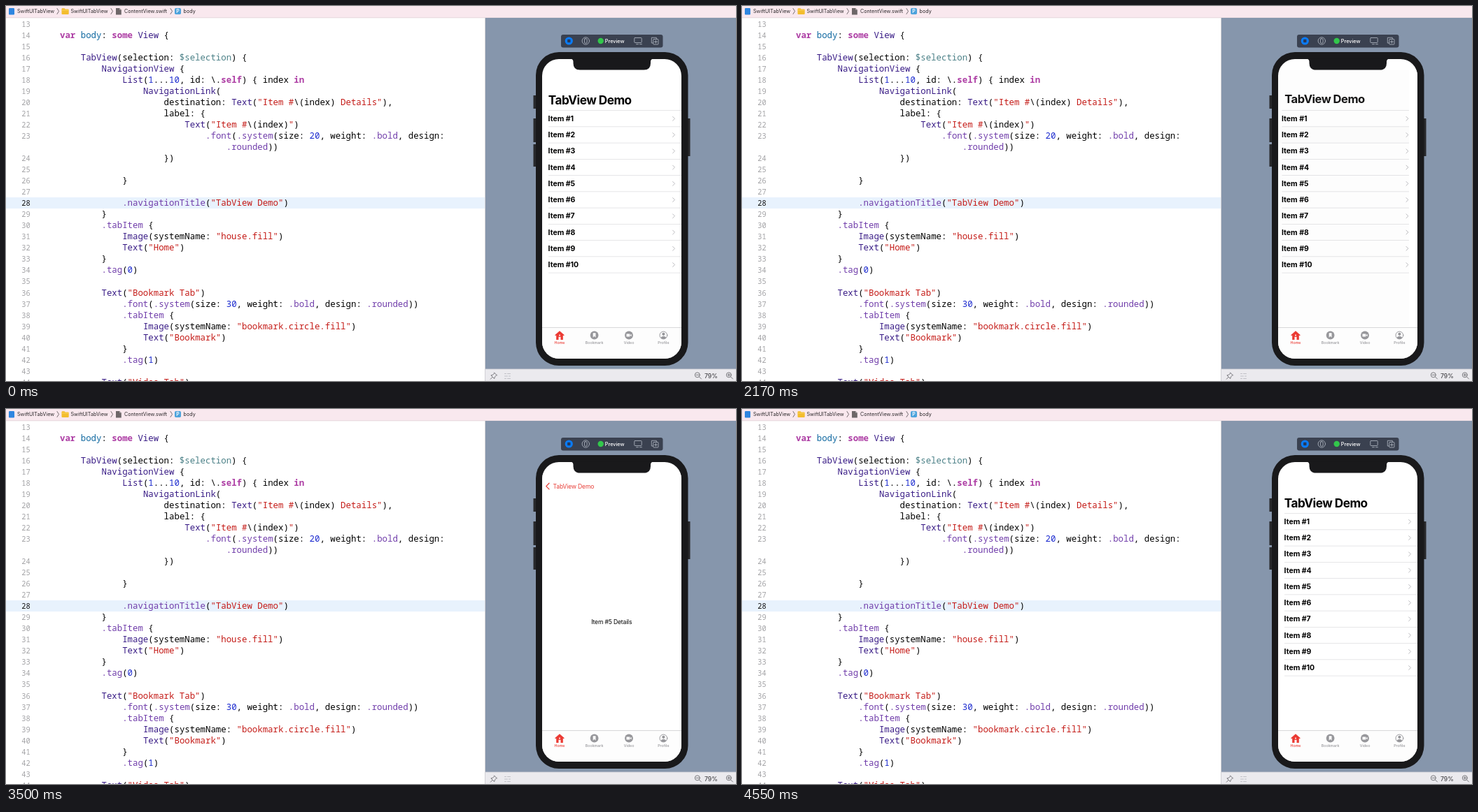
These frames come from a looping animation (1043x537 px, 4830 ms). An HTML page:

```html
<!DOCTYPE html>
<html lang="en">
<head>
<meta charset="utf-8">
<title>TabView Demo</title>
<style>
  html, body { margin: 0; width: 100%; height: 100%; overflow: hidden; background: #fff; }
  svg { display: block; width: 1043px; height: 537px; }
  text { font-family: Inter, "Open Sans", sans-serif; white-space: pre; }
  .code text { font-family: "Noto Sans Mono", "DejaVu Sans Mono", monospace; font-size: 12.38px; font-weight: 500; }
  .code .num { font-size: 10.4px; font-weight: 400; fill: #a3a3a6; text-anchor: end; }
  .code .now { fill: #111; font-weight: 500; }
  .key { fill: #ad3da4; font-weight: 600; }
  .type { fill: #391c86; }
  .call { fill: #703daa; }
  .str { fill: #c41a16; }
  .lit { fill: #1c2bcf; }
  .decl { fill: #0f68a0; }
  .state { fill: #4b8087; }
  .path { font-size: 7.2px; fill: #2c282b; }
  .item { font-size: 10.5px; font-weight: 700; }
  .big { font-size: 17.2px; font-weight: 700; letter-spacing: -.03em; }
  .small { font-size: 8.6px; letter-spacing: -.02em; }
  .tab { font-size: 5.3px; font-weight: 500; text-anchor: middle; }
  .line { fill: none; stroke-linecap: round; stroke-linejoin: round; }
</style>
</head>
<body>
<svg viewBox="0 0 1043 537">
  <defs>
    <clipPath id="screen"><rect x="766" y="76" width="199" height="429" rx="24"/></clipPath>
    <clipPath id="page"><rect x="766" y="92" width="199" height="368.5"/></clipPath>
  </defs>

  <rect width="1043" height="537" fill="#fff"/>
  <rect y="274" width="685" height="16" fill="#e8f2fd"/>
  <g class="code" id="code"></g>

  <!-- path bar -->
  <rect width="1043" height="17" fill="#f9e8ee"/>
  <rect y="16.5" width="1043" height=".7" fill="#dccfd4"/>
  <rect x="4" y="3" width="8" height="9.5" rx="1.2" fill="#2f86e0"/>
  <path d="M79.5 4.2q0-1 1-1h3l1.2 1.2h4q1 0 1 1v5.6q0 1-1 1h-8.200q-1 0-1-1z" fill="#f3bd2e"/>
  <path d="M79.500 6h10.200" stroke="#fbd768" stroke-width=".8"/>
  <path d="M157 3h5.200l2.600 2.600v7h-7.800z" fill="#6d6668"/>
  <path d="M162.200 3v2.600h2.600z" fill="#bdb4b7"/>
  <rect x="241" y="3" width="9" height="9" rx="1.800" fill="#4da3dc"/>
  <text x="245.500" y="10.100" font-size="7" font-weight="600" text-anchor="middle" fill="#fff">P</text>
  <path class="line" d="M73 3.500l2.500 4-2.500 4M150 3.500l2.500 4-2.500 4M235 3.500l2.500 4-2.500 4" stroke="#554d51" stroke-width=".8"/>
  <g class="path">
    <text x="16" y="10.200">SwiftUITabView</text>
    <text x="92.500" y="10.200">SwiftUITabView</text>
    <text x="169" y="10.200">ContentView.swift</text>
    <text x="253.500" y="10.200">body</text>
  </g>

  <!-- preview canvas -->
  <rect x="685" y="17" width="358" height="503" fill="#8696ac"/>
  <rect x="685" y="520" width="358" height="17" fill="#ebeaee"/>
  <rect x="684" y="17" width="1" height="520" fill="#d2d2d6"/>
  <rect x="685" y="519.600" width="358" height=".8" fill="#cfcfd6"/>
  <g class="line" stroke="#6b6b70" stroke-width=".9">
    <path d="M697.500 525l4 4M698 525.500l-2.500 2.800-2.600.6 4.800 4.800.7-2.700 2.700-2.500M695 531.500l-2.800 2.800"/>
    <path d="M712.500 526.500h2M716.500 526.500h4M712.500 530h4M718.500 530h2M712.500 533.500h2M716.500 533.500h4" stroke="#bcbcc2"/>
    <circle cx="987.800" cy="528.300" r="3.500"/><path d="M990.500 531l3 3M986 528.300h3.600"/>
    <circle cx="1032.800" cy="528.300" r="3.500"/><path d="M1035.500 531l3 3M1031 528.300h3.600M1032.800 526.500v3.600"/>
  </g>
  <text x="998" y="533" font-size="8.700" fill="#303034">79%</text>

  <rect x="793" y="41" width="145.500" height="18.500" rx="3" fill="#3a4150"/>
  <circle cx="804.300" cy="50" r="5.600" fill="#0a7cff"/>
  <rect x="802.100" y="47.800" width="4.400" height="4.400" rx=".6" fill="#26395a"/>
  <g class="line" stroke="#a9afba" stroke-width=".9">
    <circle cx="828.300" cy="50" r="5.200"/><rect x="826.500" y="46.800" width="3.600" height="6.400" rx=".8"/>
    <rect x="897.800" y="45.500" width="10.400" height="7" rx=".8"/><path d="M900.500 54.700h3M905.500 54.700h3"/>
    <path d="M924.500 53h-2.200v-7.700h7v1.800"/><rect x="924.800" y="47.500" width="7.200" height="7.500" rx=".8"/>
    <path d="M926.500 51.200h3.800M928.400 49.300v3.800"/>
  </g>
  <circle cx="849.700" cy="50" r="4.200" fill="#32c74b"/>
  <text x="855.800" y="52.700" font-size="7.300" font-weight="500" fill="#fff">Preview</text>

  <!-- phone -->
  <path d="M753.500 128h5v19h-5zM753.500 161h5v34h-5zM753.500 198h5v32h-5zM972 161h5.500v54h-5.500z" fill="#28282b"/>
  <rect x="757" y="66" width="217.500" height="449" rx="33" fill="#19191b"/>
  <g clip-path="url(#screen)">
    <rect x="766" y="76" width="199" height="429" fill="#fff"/>
    <g clip-path="url(#page)">
      <g id="list"></g>
      <rect id="dim" x="766" y="92" width="199" height="369"/>
      <g id="detail">
        <rect x="766" y="92" width="199" height="369" fill="#fff"/>
        <text class="small" id="label" x="865.300" y="308.300" text-anchor="middle"></text>
      </g>
      <path class="line" id="back" d="M776 106.300l-4.200 4.300 4.200 4.300" stroke="#e8403a" stroke-width="1.300"/>
      <text class="small" id="small" fill="#e8403a">TabView Demo</text>
      <text class="big" id="big">TabView Demo</text>
    </g>
    <rect x="766" y="460.500" width="199" height="45" fill="#fdfdfd"/>
    <rect x="766" y="460.200" width="199" height=".8" fill="#cfcfd1"/>
    <path d="M791 465.300l6.800 6-.9 1-1.100-.9v6.600h-9.600v-6.600l-1.100.9-.9-1z" fill="#eb3a33"/>
    <path d="M789.500 478v-4.200h3v4.200z" fill="#fff"/>
    <circle cx="791" cy="471.500" r="1" fill="#fff"/>
    <g fill="#97979b">
      <circle cx="840.600" cy="471.500" r="5.900"/>
      <circle cx="890" cy="471.500" r="5.900"/>
      <circle class="line" cx="939.400" cy="471.500" r="5.400" fill="none" stroke="#97979b"/>
      <circle cx="939.400" cy="469.800" r="2.100"/>
      <path d="M935.300 475.300q1.200-2.500 4.100-2.500t4.100 2.500q-1.700 1.700-4.100 1.700t-4.100-1.700z"/>
    </g>
    <path d="M838.700 468.300h3.800v6.400l-1.900-1.900-1.900 1.900zM886.500 469.500h4.800v4h-4.800zM891.800 471l1.800-1.200v3.400l-1.800-1.200z" fill="#fff"/>
    <g class="tab" fill="#97979b">
      <text x="791" y="484.400" fill="#eb3a33">Home</text>
      <text x="840.600" y="484.400">Bookmark</text>
      <text x="890" y="484.400">Video</text>
      <text x="939.400" y="484.400">Profile</text>
    </g>
  </g>
  <path d="M806 75.500q4.500 0 4.500 4.500v2q0 9.500 9.500 9.500h91.500q9.500 0 9.500-9.500v-2q0-4.500 4.500-4.500z" fill="#19191b"/>
</svg>

<script>
const $ = id => document.getElementById(id);

// ---- editor text ----
const source = `
    var body: some View {

        TabView(selection: $selection) {
            NavigationView {
                List(1...10, id: \\.self) { index in
                    NavigationLink(
                        destination: Text("Item #\\(index) Details"),
                        label: {
                            Text("Item #\\(index)")
                                .font(.system(size: 20, weight: .bold, design:
                                    .rounded))
                        })

                }

                .navigationTitle("TabView Demo")
            }
            .tabItem {
                Image(systemName: "house.fill")
                Text("Home")
            }
            .tag(0)

            Text("Bookmark Tab")
                .font(.system(size: 30, weight: .bold, design: .rounded))
                .tabItem {
                    Image(systemName: "bookmark.circle.fill")
                    Text("Bookmark")
                }
                .tag(1)

            Text("Video Tab")`.split("\n");

const rules = [
  ["str", '"[^"]*"'],
  ["key", "\\b(?:var|some|in|self)\\b"],
  ["lit", "\\b\\d+"],
  ["type", "\\b(?:TabView|NavigationView|NavigationLink|View|List|Text|Image)\\b"],
  ["call", "\\.(?:font|system|bold|rounded|navigationTitle|tabItem|tag)\\b"],
  ["state", "\\$selection"],
  ["decl", "\\bbody\\b"]
];
const pattern = new RegExp(rules.map(([name, re]) => `(?<${name}>${re})`).join("|"), "g");
const span = (name, s) => `<tspan class="${name}">${s}</tspan>`;

function paint(line) {
  return line.replace(pattern, (...args) => {
    const groups = args[args.length - 1];
    const name = Object.keys(groups).find(k => groups[k] !== undefined);
    if (name !== "str") return span(name, args[0]);
    return args[0].split(/(\\\(index\))/)
      .map((s, i) => i % 2 ? s : span("str", s)).join("");
  });
}

const CHAR = 7.43, wrapped = 11;
$("code").innerHTML = source.map((line, i) => {
  const y = 29.8 + 16.03 * i;
  const body = line.trimStart();
  const n = 13 + i - (i >= wrapped ? 1 : 0);
  const num = i === wrapped ? "" :
    `<text class="num${n === 28 ? " now" : ""}" x="34.8" y="${y}">${n}</text>`;
  const x = 47.3 + (line.length - body.length) * CHAR;
  return num + (body ? `<text x="${x}" y="${y}">${paint(body)}</text>` : "");
}).join("");

// ---- phone list ----
const ROW = 23.25, TOP = 149.6, LEFT = 766, WIDTH = 199;
let rows = `<rect id="mark" x="${LEFT}" width="${WIDTH + 70}" height="${ROW}" fill="#d1d1d6"/>`;
for (let i = 0; i <= 10; i++) {
  const y = TOP + ROW * i;
  rows += `<rect x="775" y="${y - .35}" width="260" height=".7" fill="#dcdcde"/>`;
  if (i < 10) rows += `<text class="item" x="774.6" y="${y + 15.3}">Item #${i + 1}</text>
    <path class="line" d="M952.6 ${y + 8.8}l2.900 2.900-2.900 2.900" stroke="#bcbcc0" stroke-width="1"/>`;
}
$("list").innerHTML = rows;

// ---- motion ----
const LOOP = 4830, STEP = 70, OMEGA = .01826;
const moves = [
  { at: 0, start: -2000, item: 5 },
  { at: 700, start: 563, item: 2, push: true, cut: 770 },
  { at: 1890, start: 1923, item: 2 },
  { at: 2730, start: 2733, item: 5, push: true },
  { at: 3920, start: 3903, item: 5 }
];

// Critically damped spring: share of the way still to go.
function remaining(move, t) {
  if (t >= move.cut) return 0;
  const x = Math.max(0, t - move.start) * OMEGA;
  const r = (1 + x) * Math.exp(-x);
  return r < .002 ? 0 : r;
}

const clamp = v => Math.min(1, Math.max(0, v));
const set = (id, name, value) => $(id).setAttribute(name, value);

function draw(t) {
  const move = moves.filter(m => m.at <= t).pop();
  const left = remaining(move, t);
  const shown = move.push ? 1 - left : left;

  set("list", "transform", `translate(${-59.5 * shown} 0)`);
  set("mark", "x", LEFT - 5);
  set("mark", "y", TOP + ROW * (move.item - 1));
  set("mark", "opacity", move.push ? 1 : left);
  set("dim", "opacity", .1 * shown);
  set("detail", "transform", `translate(${WIDTH * (1 - shown)} 0)`);
  $("label").textContent = `Item #${move.item} Details`;

  // The large title shrinks into the back button.
  const grow = Math.pow(1 - shown, move.push ? .9 : 1.2);
  const width = 60 + 62 * grow;
  const place = `translate(${781.5 - 6.7 * grow} ${113.9 + 27.4 * grow})`;
  set("small", "transform", `${place} scale(${width / 60})`);
  set("big", "transform", `${place} scale(${width / 122})`);
  const press = move.push ? 1 : .2;
  set("small", "opacity", Math.min(press, Math.pow(shown, 1.5)));
  set("big", "opacity", Math.pow(1 - shown, 1.5));
  set("back", "opacity", press * clamp((shown - .75) * 4));
}

const begin = performance.now();
function tick(now) {
  const t = Math.max(0, now - begin) % LOOP;
  draw(Math.floor(t / STEP) * STEP);
  requestAnimationFrame(tick);
}
draw(0);
requestAnimationFrame(tick);
</script>
</body>
</html>
```
